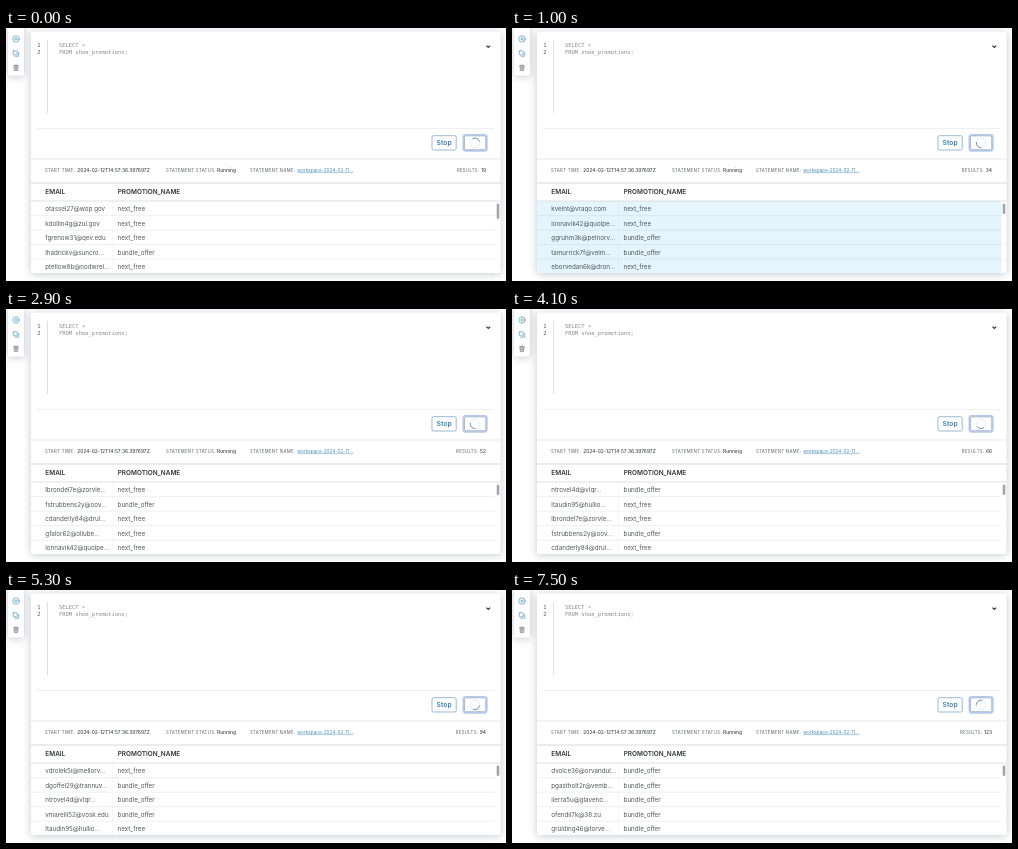
An HTML page that plays this animation: 500x253 px, repeating every 7.6 s.

```html
<!DOCTYPE html>
<html lang="en">
<head>
<meta charset="utf-8">
<title>Streaming query results</title>
<style>
  html, body { margin: 0; width: 100%; height: 100%; overflow: hidden; background: #fff; }
  svg { display: block; width: 500px; height: 253px; font-family: Inter, "Open Sans", sans-serif; }
  .panel { fill: #fff; filter: drop-shadow(0 1px 4px rgba(45, 50, 75, .27)); }
  .code { font: 5.45px "DejaVu Sans Mono", monospace; fill: #85888d; white-space: pre; }
  .num { fill: #555; }
  .label { font-size: 4.25px; letter-spacing: .32px; font-weight: 500; fill: #74787f; }
  .value { font-size: 4.85px; letter-spacing: 0; font-weight: 500; fill: #45494f; }
  .link { font-size: 4.7px; fill: #4a8cb8; text-decoration: underline; }
  .head { font-size: 6.45px; font-weight: 600; fill: #303338; }
  .cell { font-size: 6.25px; fill: #53575d; }
  .rule { stroke: rgba(60, 75, 90, .12); stroke-width: .7; fill: none; }
  .icon { fill: none; stroke-width: .7; stroke-linecap: round; stroke-linejoin: round; }
  .blue { stroke: #5795b8; }
  .dark { stroke: #74787d; }
</style>
</head>
<body>
<svg viewBox="0 0 500 253">
  <rect class="panel" x="2" y="-4" width="16" height="51.5" rx="2"/>
  <g class="icon blue">
    <circle cx="10" cy="11" r="3.2"/>
    <path d="M8.6 11h2.8M10 9.6v2.8"/>
    <rect x="7.2" y="22.8" width="4" height="4" rx=".6"/>
    <path d="M12.7 24.4v3.8h-3.8"/>
  </g>
  <path class="icon dark" d="M7.6 38h4.8M9.1 38v-1h1.8V38M8.1 38l.3 4.6h3.2l.3-4.6M9.4 39.4v1.9M10.6 39.4v1.9"/>

  <rect class="panel" x="25" y="3.5" width="469.5" height="241.5" rx="2"/>
  <path class="rule" style="stroke:#cfd2d5" d="M41.5 12V85"/>
  <text class="code num" x="31.2" y="18.6">1</text>
  <text class="code num" x="31.2" y="26.4">2</text>
  <text class="code" x="53" y="18.6">SELECT <tspan dy="1">*</tspan></text>
  <text class="code" x="53" y="26.4">FROM shoe_promotions;</text>
  <path d="M480.4 17.6l1.9 1.9 1.9-1.9" fill="none" stroke="#333" stroke-width="1.1"/>
  <path class="rule" d="M31 100.5H488"/>

  <rect x="426" y="107.7" width="24.2" height="14.3" rx="1.5" fill="#fff" stroke="#7fa8c4" stroke-width=".8"/>
  <text x="438.1" y="117.4" text-anchor="middle" font-size="6.8" font-weight="600" fill="#3d7fab">Stop</text>
  <rect x="457.2" y="106.6" width="23.8" height="16.4" rx="2.4" fill="#fff" stroke="#b7c8ee" stroke-width="1.4"/>
  <rect x="458.4" y="107.8" width="21.4" height="14" rx="1.5" fill="#fff" stroke="#7791b4" stroke-width=".7"/>
  <circle cx="469" cy="114.9" r="4.7" fill="none" stroke="#e3e8ef" stroke-width=".9"/>
  <path id="spin" d="M466 111.3A4.7 4.7 0 0 1 473.2 112.8" fill="none" stroke="#6a90b5" stroke-width=".9"/>

  <path class="rule" style="stroke:#dddfe2" d="M25 131H494.5"/>
  <text class="label" x="39" y="143.6">START TIME:</text>
  <text class="value" x="71.3" y="143.6">2024-02-12T14:57:36.397697Z</text>
  <text class="label" x="160" y="143.6">STATEMENT STATUS:</text>
  <text class="value" x="211" y="143.6">Running</text>
  <text class="label" x="244" y="143.6">STATEMENT NAME:</text>
  <text class="link" x="291.3" y="143.6">workspace-2024-02-11...</text>
  <text class="label" x="480" y="143.6" text-anchor="end">RESULTS: <tspan class="value" id="count"></tspan></text>

  <path class="rule" style="stroke:#c6c9cd" d="M25 155H494.5"/>
  <text class="head" x="39.3" y="165.8">EMAIL</text>
  <text class="head" x="111.7" y="165.8">PROMOTION_NAME</text>
  <rect id="flash" x="25" y="173" width="464.5" height="72" fill="#e4f5fd"/>
  <path class="rule" style="stroke:#d0d3d7" d="M25 173H494.5"/>
  <path class="rule" d="M106.3 173V245" stroke-dasharray="1 1"/>
  <g id="rows"></g>
  <rect id="thumb" x="490.7" y="175.5" width="2.6" rx="1.2" fill="#a2a5a9"/>
</svg>
<script>
const LOOP = 7600, STEP = 100, SPIN = LOOP / 12;
const ROW_Y = 183.2, ROW_H = 14.5;
const $ = id => document.getElementById(id);

// Each page: five addresses, then one letter per offer (n = next_free, b = bundle_offer).
const pages = [
  ["otassel27@wop.gov kdollin4g@zul.gov fgrenow31@qev.edu lhadrickv@suncro... ptellow8b@nodwrel...", "nnnbn"],
  ["kvelnt@vraqo.com lonnavik42@quolpe... ggruhm3k@pelnorv... tamurrick7f@velm... eborvedan6k@dron...", "nnbbn"],
  ["vmarelli52@vosk.edu dlorn4@ulzeth.com pfaverinda3h@g... gtandor8w@pelvo... kjorl3a@ivux.com", "nbnnn"],
  ["lbrondel7e@zorvle... fstrubbens2y@oov... cdanderly84@drul... gfalor62@ollube... lonnavik42@quolpe...", "nbnnn"],
  ["ntrovel4d@vlqr... ltaudin95@hullio... lbrondel7e@zorvle... fstrubbens2y@oov... cdanderly84@drul...", "bnnbn"],
  ["vdrolek5i@mellorv... dgoffel29@trannuv... ntrovel4d@vlqr... vmarelli52@vosk.edu ltaudin95@hullio...", "nbbbn"],
  ["erubbs3e@dalvim... ntrovel4d@vlqr... vmarelli52@vosk.edu odranch5f@melk-... gcadorley8h@purn...", "bbbbb"],
  ["dvolce36@orvandul... pgastholt2r@vemb... ilerra5u@glaveno... ofendil7k@38.zu grulding46@torve...", "bbbbb"]
].map(([mails, offers]) => [mails.split(" "), [...offers].map(c => c === "n" ? "next_free" : "bundle_offer")]);

// Steps: [start ms, value]
const pageSteps = [[0, 0], [700, 1], [1700, 2], [2400, 3], [3500, 4], [4600, 5], [5700, 6], [6600, 7]];
const countSteps = [[0, 19], [400, 27], [700, 34], [1700, 38], [2400, 52], [3500, 66], [4600, 80],
  [5200, 94], [5700, 108], [6600, 119], [7300, 123]];
const flashes = [[700, 1200], [1700, 2000], [2400, 2800], [3500, 3900], [4600, 5200], [5700, 6000]];

const valueAt = (steps, t) => steps.filter(([start]) => start <= t).pop()[1];

function add(tag, attrs) {
  const el = document.createElementNS("http://www.w3.org/2000/svg", tag);
  for (const key in attrs) el.setAttribute(key, attrs[key]);
  return $("rows").appendChild(el);
}

const cells = pages[0][0].map((_, i) => {
  const y = ROW_Y + i * ROW_H;
  if (i < 4) add("path", { class: "rule", d: `M25 ${y + 4.5}H489.5` });
  return [39.3, 111.6].map(x => add("text", { class: "cell", x, y }));
});

let shown = -1;
function draw() {
  const t = Math.floor(performance.now() % LOOP / STEP) * STEP;
  const page = valueAt(pageSteps, t);
  if (page !== shown) {
    cells.forEach((row, i) => row.forEach((cell, col) => cell.textContent = pages[page][col][i]));
    shown = page;
  }
  $("count").textContent = valueAt(countSteps, t);
  $("flash").style.opacity = flashes.some(([on, off]) => t >= on && t < off) ? 1 : 0;
  $("thumb").setAttribute("height", t < 700 ? 15.5 : 10.5);
  $("spin").setAttribute("transform", `rotate(${t % SPIN / SPIN * 360 + 8} 469 114.9)`);
  requestAnimationFrame(draw);
}
draw();
</script>
</body>
</html>
```
